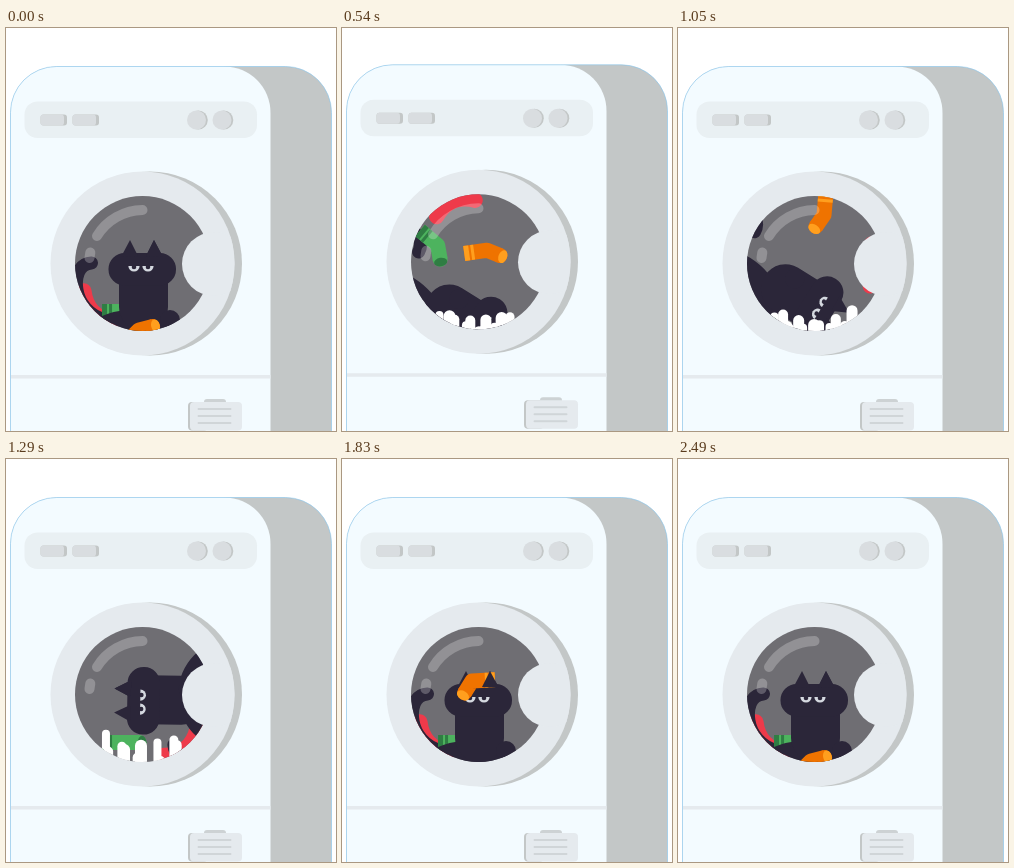
Recreate the animation shown at these times as an HTML page with a canvas. Size 330 px wide and 403 px high, loop 2520 ms.

```html
<!DOCTYPE html>
<html>
<head>
<meta charset="utf-8">
<title>Cat in the wash</title>
<style>
html, body { margin: 0; width: 100%; height: 100%; overflow: hidden; background: #fff; }
canvas { display: block; }
</style>
</head>
<body>
<canvas id="stage" width="330" height="403"></canvas>
<script>
const ctx = document.getElementById('stage').getContext('2d');
const LOOP = 2520, STEP = 30, WASH_END = 1620, SETTLED = 540, RIGHTING = 1050;
const CX = 136.5, CY = 235.5, R = 67.5, RAD = Math.PI / 180;
const RIM = '#e5eaee', SHADE = '#c3c7c7', KNOB = '#d9dde0', FUR = '#2b2639';
const { sin, cos, PI } = Math;

// Progress from a to b, clamped to 0..1
const span = (a, b, t) => Math.max(0, Math.min(1, (t - a) / (b - a)));
const easeOut = p => 1 - (1 - p) ** 1.8;

function fill(color) { ctx.fillStyle = color; ctx.fill(); }

function box(x, y, w, h, r, color) {
  ctx.beginPath();
  ctx.roundRect(x, y, w, h, r);
  fill(color);
}

function oval(x, y, rx, ry, color) {
  ctx.beginPath();
  ctx.ellipse(x, y, rx, ry, 0, 0, 7);
  fill(color);
}

const disc = (x, y, r, color) => oval(x, y, r, r, color);

function stroke(path, width, color, cap = 'round') {
  ctx.lineWidth = width;
  ctx.strokeStyle = color;
  ctx.lineCap = cap;
  ctx.lineJoin = 'round';
  ctx.stroke(new Path2D(path));
}

function placed(x, y, deg, draw) {
  ctx.save();
  ctx.translate(x, y);
  ctx.rotate(deg * RAD);
  draw();
  ctx.restore();
}

const polar = (deg, r) => [CX + r * cos(deg * RAD), CY + r * sin(deg * RAD)];

function sock(x, y, foot, bend, color, light) {
  placed(x, y, foot, () => {
    const a = (180 - bend) * RAD;
    const leg = d => `${d * cos(a)} ${d * sin(a)}`;
    stroke(`M${leg(23)}L0 0L14 0`, 15, color, 'butt');
    disc(14, 0, 7.5, color);
    oval(17, 0, 4.3, 6.6, light);
    stroke(`M${leg(23)}L${leg(18)}M${leg(16)}L${leg(13)}`, 15, light, 'butt');
  });
}

// Rides once around the drum, dropping inwards over the top
function redSock(p) {
  const angle = 136 + 360 * p - 12 * sin(2 * PI * p) ** 2;
  placed(...polar(angle, 68 - 18 * sin(PI * p) ** 12), angle + 90, () =>
    stroke('M-21 7Q0 -9 21 7', 15, '#ee3a4a'));
}

// Is carried up the left wall and slides back
function greenSock(p) {
  const swing = Math.max(0, sin(1.5 * PI * p)) ** 6;
  const [x, y] = polar(110 + 92 * swing, 51 - 7 * swing);
  sock(x, y, 80 * swing, 40 * swing, '#4db35e', '#2f7d43');
}

// Tumbles through a few poses: x, y, foot angle
const REST = [133, 302, -14], ON_HEAD = [130, 222, 122];
const tumble = [
  [0, REST], [540, [145, 224, 22]], [780, [112, 289, 10]], [1050, [146, 187, 125]],
  [1290, [218, 235, 200]], [1650, [140, 145, 140]], [1800, ON_HEAD], [2190, ON_HEAD],
  [2280, [114, 201, 70]], [2490, REST], [LOOP, REST]
];

function orangeSock(t) {
  const i = tumble.findIndex(([time]) => time > t);
  const [t0, from] = tumble[i - 1], [t1, to] = tumble[i];
  const p = span(t0, t1, t);
  const [x, y, foot] = from.map((v, j) => v + (to[j] - v) * p);
  const bend = 30 - 85 * (span(1300, 1650, t) - span(2190, 2400, t));
  sock(x, y, foot, bend, '#ef7300', '#ff9f1e');
}

function catPose(t) {
  const righting = easeOut(span(RIGHTING, WASH_END, t));
  const curl = easeOut(span(0, 450, t)) - righting;
  const slide = span(SETTLED, RIGHTING, t), sink = curl ** 3;
  return {
    x: 136 + sink * (5 + 12 * sin(PI * slide)),
    y: 240 + sink * (62 - 22 * slide) + 2 * sin(PI * span(1750, 1830, t)),
    angle: 122 * easeOut(span(0, SETTLED, t)) + 238 * righting,
    curl
  };
}

function inCat({ x, y, angle }, draw) {
  placed(x, y, angle, () => {
    ctx.translate(-136, -240);
    draw();
  });
}

function tail(curl) {
  ctx.save();
  ctx.translate(20 * curl, 100 * curl);
  stroke('M85.5 235C72 236 69 250 71 262S82 288 100 292', 13, FUR);
  ctx.restore();
}

function ear(tip, side) {
  ctx.beginPath();
  ctx.moveTo(tip - 8 * side, 228);
  ctx.lineTo(tip, 212);
  ctx.lineTo(tip + 9 * side, 229);
  fill(FUR);
}

function catBody(curl) {
  oval(125 + 51 * curl, 330 - 5 * curl, 60 - 14 * curl, 48 + 12 * curl, FUR);
  box(113, 245, 49, 58, [0, 0, 24, 24], FUR);
  disc(164 - 40 * curl, 292 - 16 * curl, 10, FUR);
  box(102.5, 225, 67.5, 32.5, 16, FUR);
  ear(124, -1);
  ear(148, 1);
  for (const x of [128, 142]) {
    ctx.beginPath();
    ctx.arc(x, 238, 5.6, 0, PI);
    fill('#d5d9e0');
    disc(x, 239, 2.3, FUR);
  }
}

function foam(t) {
  const level = Math.min(span(150, 450, t), span(1580, 1380, t));
  const surge = 7 + 9 * span(1050, 1290, t);
  for (let i = 0; i < 15; i++) {
    const x = 98 + i * 5.3 + 2 * sin(t / 90 + i * 2);
    const floor = CY + Math.sqrt(R * R - (x - CX) ** 2);
    const height = level * (6 + surge * sin(i * 1.9 + t / 170)) - 4;
    if (height > -4) stroke(`M${x} ${floor + 7}V${floor - height}`, 8 + i * 7 % 5, '#fff');
  }
}

function cabinet() {
  box(4.5, 38.5, 321, 420, 46, SHADE);
  box(4.5, 38.5, 260, 420, 46, '#f3fbff');
  stroke('M4.5 410V84.5A46 46 0 0 1 50.5 38.5H279.5A46 46 0 0 1 325.5 84.5V410', .6, '#83c4ee');
  box(18.5, 73.5, 232.5, 36.5, 13, '#e9f0f3');
  for (const x of [34.5, 66.5]) {
    box(x, 86.5, 26.5, 11, 3, SHADE);
    box(x, 86.5, 23.5, 11, 3, KNOB);
  }
  for (const x of [190.5, 216]) {
    disc(x + 1.8, 92, 9.5, SHADE);
    disc(x, 92, 9.5, KNOB);
  }
  box(5, 347, 259.5, 3.5, 0, RIM);
  box(182, 374, 20, 28.5, 4, SHADE);
  box(198, 371, 22, 8, 3, '#cdd2d4');
  box(184, 374, 52, 28.5, 4, RIM);
  for (const y of [381, 388, 395]) stroke(`M192.5 ${y}H224.5`, 2, '#d0d5d8');
  disc(144, CY, 92, SHADE);
}

function drum(t) {
  const cat = catPose(t), turn = span(0, WASH_END, t);
  ctx.save();
  disc(CX, CY, 92, RIM);
  ctx.clip();
  ctx.save();
  disc(CX, CY, R, '#6f6e73');
  ctx.clip();
  redSock(turn);
  inCat(cat, () => tail(cat.curl));
  greenSock(turn);
  inCat(cat, () => catBody(cat.curl));
  orangeSock(t);
  inCat(cat, () => ear(148, 1));
  foam(t);
  const shine = 'rgba(255,255,255,.24)';
  stroke('M136.5 182A54 54 0 0 0 91 208', 10, shine);
  stroke('M84.3 224.5L83.5 230', 10, shine);
  ctx.restore();
  disc(208, 236, 32, RIM);
  ctx.restore();
}

function render(now) {
  const t = now % LOOP, tick = Math.floor(t / STEP);
  const lift = t < WASH_END && tick > 0 && tick % 2 === 0 ? -1.7 : 0;
  ctx.clearRect(0, 0, 330, 403);
  ctx.save();
  ctx.translate(0, lift);
  cabinet();
  drum(t);
  ctx.restore();
}

let start;
function frame(now) {
  start ??= now;
  render(now - start);
  requestAnimationFrame(frame);
}
requestAnimationFrame(frame);
</script>
</body>
</html>
```
